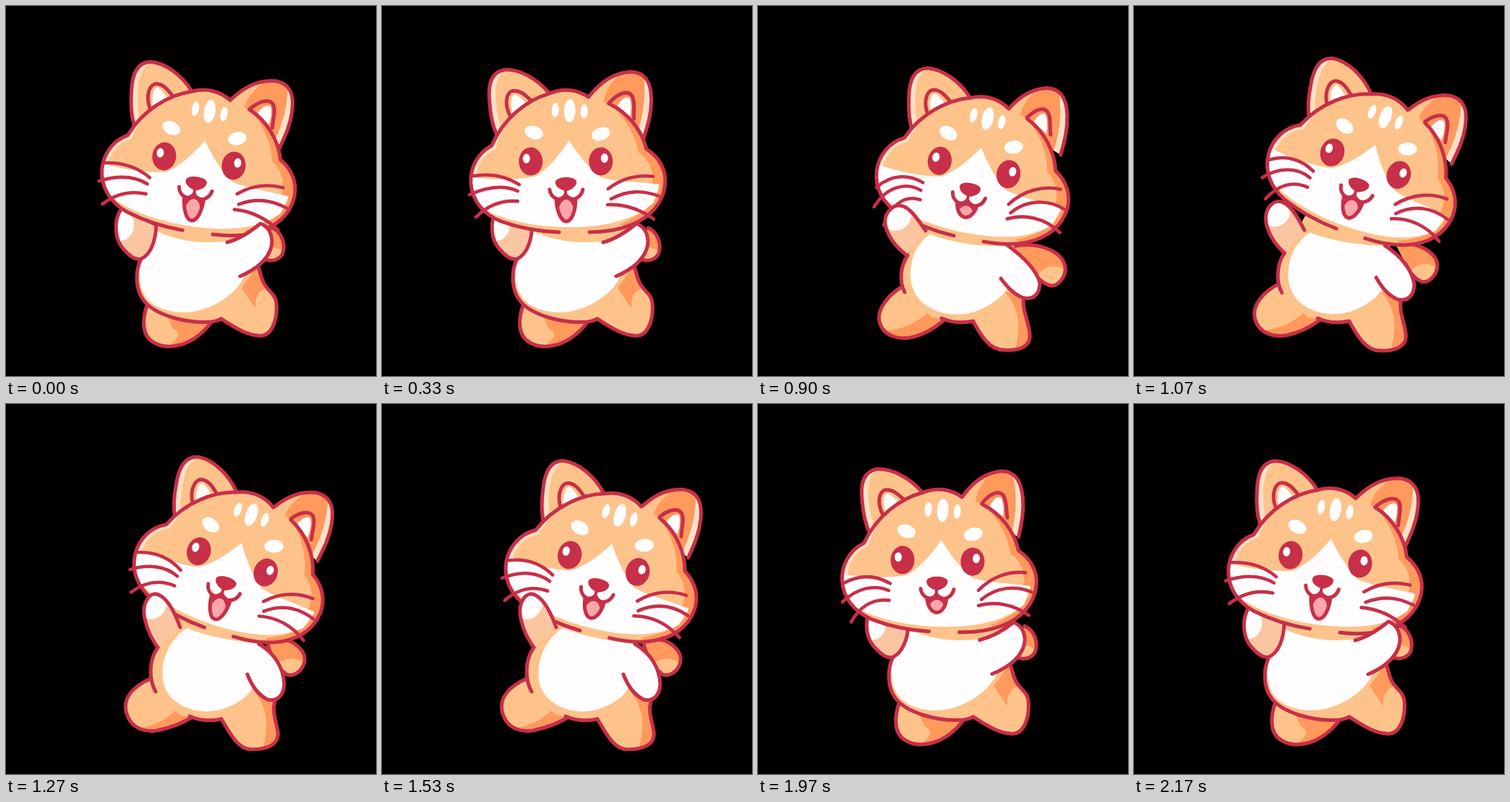
Animation of 512 by 512 pixels, one loop 2.21 s. Source, as an HTML page with a canvas:

```html
<!DOCTYPE html>
<html lang="en">
<head>
<meta charset="utf-8">
<title>Dancing cat</title>
<style>
html, body { margin: 0; width: 100%; height: 100%; overflow: hidden; background: #000; }
canvas { display: block; width: 100vw; height: 100vh; }
</style>
</head>
<body>
<canvas id="stage" width="512" height="512"></canvas>
<script>
const ctx = document.getElementById('stage').getContext('2d');
const LOOP = 2210, STEP = 100 / 3, STEPS = 66;
const LINE = '#c82f48', BASE = '#fdc38b', DARK = '#ff995c', ARM = '#fcc5a1',
      PALE = '#fee0c6', WHITE = '#fffdfe', PINK = '#fba6aa';

// time, x, y, tilt, left whisker curl, right whisker curl, mouth, ear swing
const HEAD = [
  [0, 267, 214.5, 7.7, 0, 0, 1, 0],
  [330, 254.5, 215, 0, 0, 0, 1, 0],
  [520, 244, 221.5, -4.5, 0, 0.5, 0, -10],
  [570, 246, 221.5, -4, 0, 0.7, 0, -12],
  [720, 267, 226, 3, 0.7, 1, 0, -13],
  [900, 299, 223.5, 11, 1, 0.95, 0, -13],
  [1080, 321, 218, 19, 0.5, 0.7, 0.7, -10],
  [1270, 313, 218.5, 17.5, 0.2, 0.4, 1, -8],
  [1450, 308, 221, 15, 0.1, 0.3, 1, -6],
  [1640, 301, 219, 12, 0.5, 0.6, 0, -10],
  [1770, 269, 213.5, 5.3, 1, 1, 0, -11],
  [1930, 248, 217, 1, 0.5, 0.6, 0, -8],
  [2170, 265, 215, 7.1, 0, 0, 1, 0]
];

const left = {
  tail: 'M368 307 C382 313 387 330 383 342 C379 351 368 354 360 351 C355 350 350 350 345 350',
  legL: 'M196 412 C189 430 186 456 205 466 C225 477 258 471 283 439',
  side: 'M187 350 C179 365 178 392 191 408 C206 427 248 440 285 437 C290 436 294 435 298 433',
  legR: 'M298 433 C315 444 336 458 355 456 C371 453 376 428 374 410 C372 397 362 395 356 382 C352 373 352 367 348 358',
  belly: 'M208 311 C204 335 188 340 185 362 C182 395 195 420 240 424 C280 426 318 400 330 374 L330 320 C290 332 240 328 208 311Z',
  armL: 'M160 280 C148 297 150 324 164 338 C172 347 180 352 187 350 C200 344 207 326 208 303',
  armR: 'M306 327 C325 322 340 311 352 301 C366 306 371 322 366 337 C360 353 345 365 324 374'
};
const leftKick = {
  tail: 'M345 314 C375 300 401 318 398 340 C394 360 380 367 372 354 C362 353 356 370 352 384',
  legL: 'M195 415 C188 432 186 456 204 467 C225 479 256 471 281 439',
  side: 'M183 357 C176 372 176 396 190 411 C206 429 245 441 285 437 C291 436 297 434 302 432',
  legR: 'M302 432 C325 439 345 450 362 449 C380 447 384 425 380 410 C376 397 362 396 356 384 C350 374 347 368 340 360',
  belly: 'M202 317 C198 345 184 350 181 368 C180 400 198 424 240 426 C280 426 312 400 328 374 L326 322 C290 334 240 332 202 317Z',
  armL: 'M148 303 C133 313 137 336 158 349 C170 358 180 362 187 358 C197 350 200 333 200 317',
  armR: 'M294 334 C312 320 316 308 324 290 C340 288 353 300 352 320 C350 345 335 362 323 373'
};
const leftIn = {
  ...left,
  tail: 'M371 308 C386 314 391 331 386 343 C382 352 371 356 363 352 C358 350 352 350 347 350',
  armL: 'M146 299 C138 313 148 335 164 344 C174 352 182 355 188 350 C200 342 208 325 209 310',
  armR: 'M309 325 C330 320 346 315 359 305 C374 312 377 328 369 341 C360 357 345 365 324 372'
};
const right = {
  tail: 'M352 333 C385 325 420 338 425 360 C427 375 415 388 405 387 C397 385 392 381 386 375',
  legL: 'M200 388 C180 400 164 420 168 437 C174 459 198 462 215 458 C231 454 245 445 256 436',
  side: 'M207 345 C197 360 195 381 203 396',
  legR: 'M298 437 C308 455 320 476 340 476 C362 478 378 470 376 455 C376 440 364 420 368 400',
  belly: 'M238 316 C214 332 206 365 214 390 C226 425 275 435 308 420 C330 410 342 398 346 388 L350 332 C310 334 270 328 238 316Z',
  armL: 'M232 311 C224 300 216 286 205 279 C190 270 174 284 176 302 C180 322 194 336 206 345',
  armR: 'M345 331 C370 349 385 365 390 383 C390 400 380 408 365 403 C351 397 343 386 336 377'
};
const rightUp = {
  tail: 'M375 325 C400 325 416 343 413 357 C409 372 396 378 388 374 C380 368 368 355 362 332',
  legL: 'M200 380 C178 390 162 405 166 425 C171 448 190 454 208 452 C230 448 245 441 258 433',
  side: 'M210 337 C197 355 198 382 207 398',
  legR: 'M298 436 C310 455 320 478 340 478 C364 478 379 470 376 452 C373 436 368 425 372 412',
  belly: 'M250 310 C220 330 212 365 219 390 C230 422 275 434 308 419 C330 410 340 398 344 386 L352 332 C315 328 280 322 250 310Z',
  armL: 'M241 309 C236 295 228 275 215 266 C200 255 187 275 192 297 C196 315 202 325 210 337',
  armR: 'M350 332 C372 345 384 365 385 388 C384 405 374 412 362 409 C348 402 340 390 334 374'
};

const BODY = [
  [0, left], [360, left], [570, leftKick], [615, leftKick],
  [616, right], [900, right], [1270, rightUp], [1700, rightUp],
  [1701, leftIn], [1790, leftIn], [2050, left], [LOOP, left]
];

const NUM = /-?[\d.]+/g;
const nums = d => d.match(NUM).map(Number);

function mix(a, b, k) {
  const to = nums(b);
  let i = 0;
  return a.replace(NUM, v => (+v + (to[i++] - v) * k).toFixed(2));
}

function bodyAt(t) {
  let i = BODY.length - 2;
  while (BODY[i][0] > t) i--;
  const [t0, a] = BODY[i], [t1, b] = BODY[i + 1];
  if (t1 - t0 < 2) return a;
  let k = (t - t0) / (t1 - t0);
  k = k * k * (3 - 2 * k);
  const pose = {};
  for (const part in a) pose[part] = mix(a[part], b[part], k);
  return pose;
}

// smooth cyclic curve through the head keys
function headAt(t) {
  const n = HEAD.length;
  const key = j => {
    const turn = Math.floor(j / n), row = HEAD[j - turn * n];
    return [row[0] + turn * LOOP, ...row.slice(1)];
  };
  let i = n - 1;
  while (HEAD[i][0] > t) i--;
  const [p, a, b, q] = [-1, 0, 1, 2].map(o => key(i + o));
  const span = b[0] - a[0], k = (t - a[0]) / span;
  return a.slice(1).map((v, c) => {
    c++;
    const m0 = (b[c] - p[c]) / (b[0] - p[0]) * span;
    const m1 = (q[c] - a[c]) / (q[0] - a[0]) * span;
    const k2 = k * k, k3 = k2 * k;
    return (2 * k3 - 3 * k2 + 1) * v + (k3 - 2 * k2 + k) * m0
         + (3 * k2 - 2 * k3) * b[c] + (k3 - k2) * m1;
  });
}

function fill(d, color) {
  ctx.fillStyle = color;
  ctx.fill(new Path2D(d));
}

function line(d, width = 5) {
  ctx.lineWidth = width;
  ctx.stroke(new Path2D(d));
}

function oval(x, y, rx, ry, color, tilt = 0) {
  ctx.fillStyle = color;
  ctx.beginPath();
  ctx.ellipse(x, y, rx, ry, tilt * Math.PI / 180, 0, 7);
  ctx.fill();
}

function inside(d, draw) {
  ctx.save();
  ctx.clip(new Path2D(d));
  draw();
  ctx.restore();
}

function turned(x, y, deg, draw) {
  ctx.save();
  ctx.translate(x, y);
  ctx.rotate(deg * Math.PI / 180);
  ctx.translate(-x, -y);
  draw();
  ctx.restore();
}

function tail(d) {
  const p = nums(d);
  fill(d, DARK);
  inside(d, () => oval((p[6] + p[12]) / 2 - 6, (p[7] + p[13]) / 2 + 4, 22, 17, BASE));
  line(d);
}

function armLeft(d, raised) {
  const p = nums(d);
  fill(d, ARM);
  inside(d, () => {
    if (raised) oval(p[6] - 14, p[7] + 10, 21, 22, WHITE, 20);
    else oval(p[6] - 4, p[7] - 34, 17, 21, WHITE, 10);
  });
  line(raised ? d : d + 'Z');
}

function armRight(d) {
  fill(d, WHITE);
  line(d);
}

function leftBody(p) {
  tail(p.tail);
  fill(p.legL, BASE);
  inside(p.legL, () => fill('M222 426 L285 436 L270 475 L222 472 C238 462 245 452 230 446 Z', DARK));
  line(p.legL);
  const torso = p.side + p.legR.replace('M', 'L') + 'L340 300 L205 300Z';
  fill(torso, BASE);
  inside(torso, () => fill('M326 390 L352 355 L364 390 C350 392 344 402 345 418Z', DARK));
  fill(p.belly, WHITE);
  line(p.side);
  line(p.legR);
  armLeft(p.armL, false);
}

function rightBody(p) {
  tail(p.tail);
  fill(p.legL, BASE);
  inside(p.legL, () => fill('M170 450 C205 448 225 435 238 420 L262 430 L250 470 L180 470Z', DARK));
  line(p.legL);
  fill(p.legR, BASE);
  fill(p.side + 'L240 430 L256 434 Q275 441 299 436 L330 440 L369 414 L352 320 L345 300 L240 285Z', BASE);
  inside(p.legR + 'L340 390Z', () => fill('M342 396 C364 420 364 450 354 480 L385 480 L380 395Z', DARK));
  fill(p.belly, WHITE);
  line(p.side);
  line('M254 432 Q274 441 298 436');
  line(p.legR);
  armRight(p.armR);
}

const EAR_L = 'M232 121 C215 100 190 87 170 88 C150 91 147 112 149 132 C150 150 153 165 159 178';
const EAR_R = 'M286 126 C300 108 320 92 345 91 C368 92 373 110 373 130 C373 150 368 165 362 184';
const SKULL = 'M286 126 C270 115 250 113 232 121 C200 130 168 156 152 193 C131 204 122 225 123 245 C125 269 140 288 165 298 C190 307 220 312 245 313';
const JAW = 'M287 313 C310 313 330 309 345 303 C372 292 390 272 392 245 C393 228 385 210 366 198 C360 172 340 147 314 135';
const FACE = SKULL + JAW.replace('M', 'L') + 'Z';
const MUZZLE = 'M259 186 C246 205 232 224 212 236 C185 241 155 241 120 236 L128 270 C145 290 200 306 258 306 C310 306 350 296 376 272 L384 247 C350 243 320 243 303 237 C284 222 270 203 259 186Z';

function earLeft() {
  const shape = EAR_L + 'L200 170Z';
  fill(shape, BASE);
  inside(shape, () => fill('M145 85 L172 88 C150 100 156 140 168 180 L140 180Z', PALE));
  line(EAR_L);
  const cup = 'M178 153 C168 134 173 117 183 117 C194 117 200 125 210 134';
  fill(cup, BASE);
  fill('M182 150 C176 132 180 122 185 122 C192 126 197 132 201 137Z', WHITE);
  line(cup);
}

function earRight() {
  const shape = EAR_R + 'L310 150Z';
  fill(shape, DARK);
  inside(shape, () => {
    fill('M362 92 C367 130 360 160 350 185 L380 185 L380 92Z', PALE);
    fill('M284 128 L318 90 L326 98 C314 110 307 122 306 140Z', BASE);
  });
  line(EAR_R);
  const cup = 'M314 135 C326 121 340 116 346 124 C351 132 348 144 349 156';
  fill(cup, DARK);
  fill('M326 138 C332 128 339 124 343 128 C346 136 345 146 343 154Z', WHITE);
  line(cup);
}

const WHISKERS_L = [
  ['M190 247 C170 234 150 231 126 235', 'M189 249 C170 242 145 244 127 268'],
  ['M188 256 C168 247 145 250 121 261', 'M188 260 C165 252 140 265 129 295'],
  ['M188 270 C165 268 145 277 130 292', 'M190 273 C165 270 152 290 147 317']
];
const WHISKERS_R = [
  ['M313 253 C330 240 350 233 375 236', 'M311 256 C328 232 355 220 378 221'],
  ['M317 267 C340 255 360 255 383 263', 'M316 267 C335 243 365 238 388 247'],
  ['M312 275 C335 274 355 280 376 295', 'M313 276 C335 264 365 264 389 280']
];

function whiskers(list, curl) {
  for (const [rest, bent] of list) line(mix(rest, bent, curl), 4.6);
}

function head([x, y, tilt, curlL, curlR, mouth, ear], shut) {
  ctx.save();
  ctx.translate(x, y);
  ctx.rotate(tilt * Math.PI / 180);
  ctx.translate(-254.5, -215);

  turned(215, 150, ear * 0.4, earLeft);
  turned(325, 150, ear, earRight);
  fill(FACE, BASE);
  inside(FACE, () => {
    fill('M215 122 C180 142 166 168 158 197 C138 206 132 222 130 240 L115 240 L120 190 L190 120Z', PALE);
    fill('M304 126 C330 146 350 172 355 202 C369 211 377 228 374 247 L384 250 C382 272 362 288 330 302 L345 315 L400 270 L400 195 L350 140Z', DARK);
    fill(MUZZLE, WHITE);
  });
  line(SKULL);
  line(JAW);

  oval(240, 144, 5, 10, WHITE, 3);
  oval(260, 145, 8, 16, WHITE, 2);
  oval(280, 146, 5, 10, WHITE, 2);
  const drop = shut ? 15 : 0;
  oval(210.5, 175 + drop, 13, 9, WHITE, 18);
  oval(303, 177 + drop, 13, 9, WHITE, -18);

  if (shut) {
    line('M190 215 C192 236 218 236 222 212', 3.2);
    line('M287 213 C291 236 316 236 320 213', 3.2);
  } else {
    oval(206, 215, 16.5, 19.5, LINE);
    oval(303, 215, 16.5, 19.5, LINE);
    oval(200, 211, 5, 6.5, WHITE);
    oval(308, 210.5, 5, 6.5, WHITE);
  }

  const jaw = mix('M241 267 C242 277 248 285 255 285 C262 285 268 276 268 267',
                  'M241 267 C242 284 248 298 255 298 C263 298 268 283 268 267', mouth);
  fill(jaw + 'L255 261Z', LINE);
  inside(jaw + 'L255 261Z', () => oval(255, 283 + 5 * mouth, 11, 14 + 6 * mouth, PINK));
  line(jaw);
  line('M232 254 C233 264 246 274 254 261 C263 274 276 264 278 254');
  line('M254 252 L254 262', 4);
  fill('M240 243 C242 235 266 235 269 242 C271 249 261 255 255 256 C248 255 239 250 240 243Z', LINE);

  whiskers(WHISKERS_L, curlL);
  whiskers(WHISKERS_R, curlR);
  ctx.restore();
}

function draw(t) {
  ctx.fillStyle = '#000';
  ctx.fillRect(0, 0, 512, 512);
  ctx.strokeStyle = LINE;
  ctx.lineCap = ctx.lineJoin = 'round';
  const pose = bodyAt(t), toRight = t > 615 && t < 1701;
  const shut = t > 490 && t < 690;
  (toRight ? rightBody : leftBody)(pose);
  head(headAt(t), shut);
  if (toRight) armLeft(pose.armL, true);
  else armRight(pose.armR);
}

const start = performance.now();
function tick() {
  const t = (performance.now() - start) % LOOP;
  draw(Math.min(STEPS - 1, Math.floor((t + 5) / STEP)) * STEP);
  requestAnimationFrame(tick);
}
tick();
</script>
</body>
</html>
```
